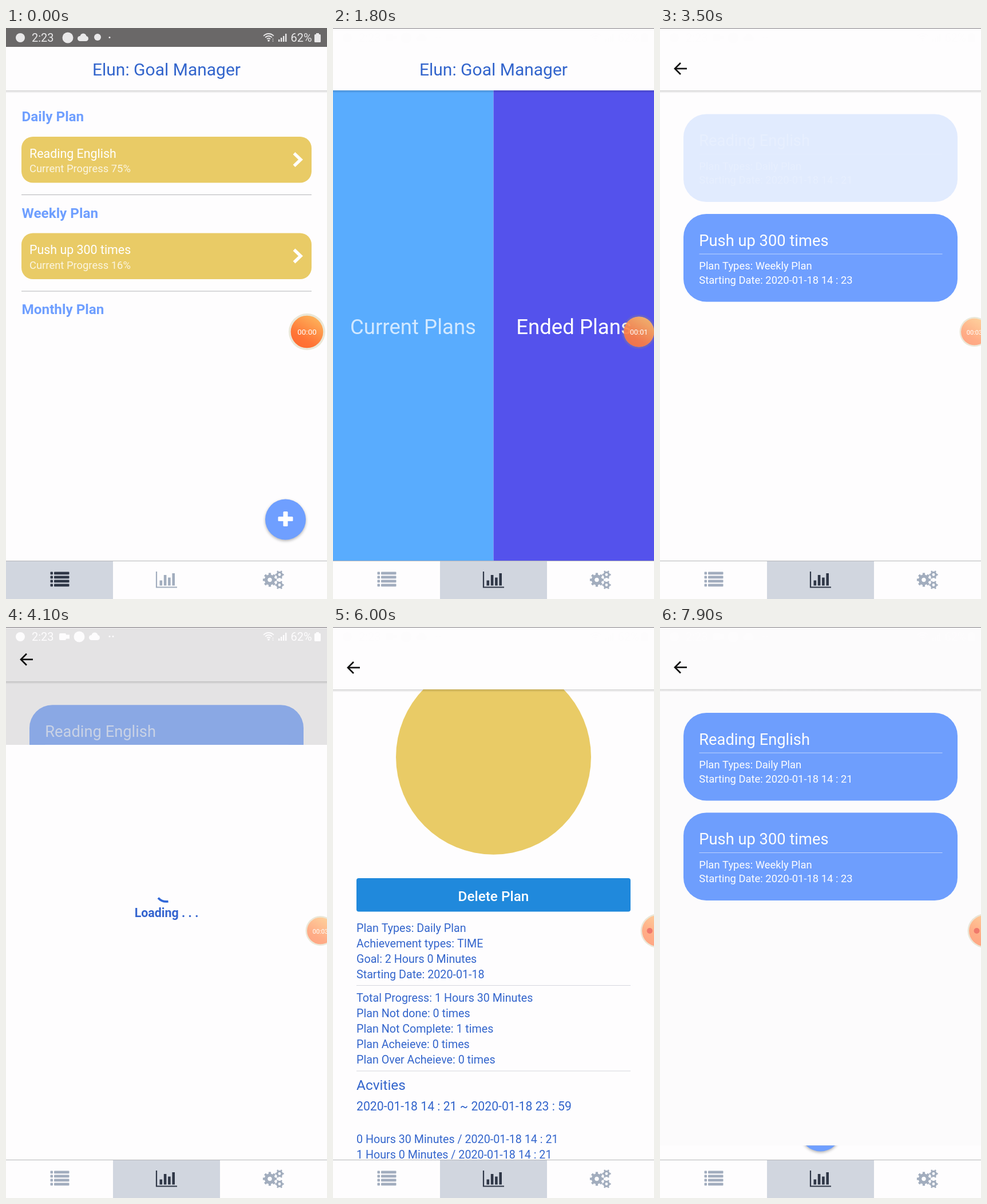
An HTML page with a canvas for the animation above (8 s loop, 561 by 998 pixels).

```html
<!DOCTYPE html>
<html lang="en">
<head>
<meta charset="utf-8">
<title>Plan manager</title>
<style>
  html, body { margin: 0; width: 100%; height: 100%; overflow: hidden; background: #fefdfe; }
  canvas { display: block; width: 100%; height: 100%; }
</style>
</head>
<body>
<canvas id="stage" width="561" height="998"></canvas>
<script>
const ctx = document.getElementById('stage').getContext('2d');
const W = 561, VIEW = 931, HEADER = 109, LOOP = 8000, STEP = 100;
const PAPER = '#fefdfe', BLUE = '#3365cc', SKY = '#6f9fff', GOLD = '#e9cb66', WHITE = '#fff';

const clamp = v => Math.max(0, Math.min(1, v));
const mix = (a, b, k) => a + (b - a) * k;
const span = (t, from, to) => clamp((t - from) / (to - from));
const easeOut = k => 1 - (1 - k) ** 3;
const easeInOut = k => k < .5 ? 2 * k * k : 1 - 2 * (1 - k) ** 2;

// cubic-bezier(.35, .45, 0, 1), solved by bisection
function revealEase(x) {
  if (x <= 0 || x >= 1) return clamp(x);
  let lo = 0, hi = 1;
  for (let i = 0; i < 24; i++) {
    const s = (lo + hi) / 2;
    if (1.05 * (1 - s) ** 2 * s + s ** 3 < x) lo = s; else hi = s;
  }
  return 1.35 * (1 - lo) ** 2 * lo + 3 * (1 - lo) * lo * lo + lo ** 3;
}
const reveal = (t, start) => revealEase((t - start) / 425);

function rect(x, y, w, h, color, radius = 0) {
  ctx.fillStyle = color;
  ctx.beginPath();
  ctx.roundRect(x, y, w, h, radius);
  ctx.fill();
}
function disc(x, y, r, color) {
  ctx.fillStyle = color;
  ctx.beginPath();
  ctx.arc(x, y, r, 0, 7);
  ctx.fill();
}
function line(points, color, width) {
  ctx.strokeStyle = color;
  ctx.lineWidth = width;
  ctx.beginPath();
  points.forEach(([x, y]) => ctx.lineTo(x, y));
  ctx.stroke();
}
function text(str, x, y, size, color, weight = 400, align = 'left') {
  ctx.font = `${weight} ${size}px Roboto, sans-serif`;
  ctx.fillStyle = color;
  ctx.textAlign = align;
  ctx.fillText(str, x, y);
}
function group(draw, alpha = 1, x = 0, y = 0) {
  ctx.save();
  ctx.globalAlpha *= alpha;
  ctx.translate(x, y);
  draw();
  ctx.restore();
}

function roundButton(x, y) {
  group(() => {
    ctx.shadowColor = 'rgba(0,0,0,.3)';
    ctx.shadowBlur = 5;
    ctx.shadowOffsetY = 2;
    disc(x, y, 35.5, SKY);
  });
  rect(x - 13, y - 5, 26, 8, WHITE, 1.5);
  rect(x - 4, y - 14, 8, 26, WHITE, 1.5);
}

function header(title) {
  const shade = ctx.createLinearGradient(0, HEADER, 0, HEADER + 5);
  shade.addColorStop(0, 'rgba(0,0,0,.16)');
  shade.addColorStop(1, 'rgba(0,0,0,0)');
  rect(0, HEADER, W, 5, shade);
  rect(0, -20, W, HEADER + 20, PAPER);
  if (title) return text(title, W / 2, 83, 30, BLUE, 400, 'center');
  line([[47, 71], [27, 71]], '#111', 2.7);
  line([[36, 61], [26, 71], [36, 81]], '#111', 2.7);
}

function planRow(heading, title, progress, y) {
  text(heading, 27.5, y + 163, 24.3, SKY, 700);
  if (!title) return;
  rect(27, y + 190, 507, 80.5, GOLD, 20);
  text(title, 41, y + 226.5, 21.4, WHITE);
  group(() => text(`Current Progress ${progress}%`, 41, y + 252, 18.4, WHITE), .8);
  line([[503.5, y + 219], [515, y + 230], [503.5, y + 241]], WHITE, 5.5);
  rect(27, y + 291, 507, 1, '#b4b4b8');
}

function homeScreen() {
  rect(0, 0, W, VIEW, PAPER);
  planRow('Daily Plan', 'Reading English', 75, 0);
  planRow('Weekly Plan', 'Push up 300 times', 16, 168.5);
  planRow('Monthly Plan', '', 0, 337);
  roundButton(488.5, 859);
  header('Elun: Goal Manager');
}

function chartScreen(t) {
  const pressed = mix(1, .2, span(t, 1750, 1900));
  const alpha = mix(pressed, 1, easeInOut(span(t, 2060, 2310)));
  rect(0, 0, W, VIEW + 20, PAPER);
  group(() => {
    rect(0, HEADER, 280.5, VIEW, '#1e90ff');
    text('Current Plans', 140, 534.5, 36.6, WHITE, 400, 'center');
  }, alpha);
  rect(280.5, HEADER, 281, VIEW, '#5452ec');
  text('Ended Plans', 421, 534.5, 36.6, WHITE, 400, 'center');
  header('Elun: Goal Manager');
}

function loadingScreen(t) {
  rect(0, 0, W, VIEW, PAPER);
  const start = (-72 + (t - 2200) * .27) * Math.PI / 180;
  ctx.strokeStyle = '#3067d8';
  ctx.lineWidth = 3.7;
  ctx.beginPath();
  ctx.arc(280.5, 452, 19.5, start, start + 1);
  ctx.stroke();
  text('Loading . . .', W / 2, 499, 21.4, '#3464cf', 700, 'center');
}

function planCard(title, type, time, y) {
  rect(41, y, 479, 153.5, SKY, 40);
  text(title, 68.3, y + 55.5, 27.3, WHITE);
  rect(68.5, y + 69.5, 425, 1, 'rgba(255,255,255,.55)');
  text(`Plan Types: ${type} Plan`, 68.3, y + 97, 18.4, WHITE);
  text(`Starting Date: 2020-01-18 ${time}`, 68.3, y + 121.5, 18.4, WHITE);
}

function listScreen(t) {
  if (t < 2400) return loadingScreen(t);
  rect(0, 0, W, VIEW + 20, PAPER);
  const alpha = t < 3500 ? 1 : mix(.2, 1, easeInOut(span(t, 3960, 4210)));
  group(() => planCard('Reading English', 'Daily', '14 : 21', 150.5), alpha);
  planCard('Push up 300 times', 'Weekly', '14 : 23', 325);
  header();
}

function detailContent() {
  const lines = (rows, y) => rows.forEach((row, i) => text(row, 41, y + 27 * i, 19.7, BLUE));
  text('Reading English', W / 2, 182.5, 30, BLUE, 400, 'center');
  disc(280.5, 388.7, 170.5, GOLD);
  rect(41, 600.5, 479, 58.5, '#2089dc', 4);
  text('Delete Plan', 280.5, 640, 24.3, WHITE, 500, 'center');
  lines(['Plan Types: Daily Plan', 'Achievement types: TIME',
    'Goal: 2 Hours 0 Minutes', 'Starting Date: 2020-01-18'], 694);
  rect(41, 787.5, 479, 1, '#d5d7de');
  lines(['Total Progress: 1 Hours 30 Minutes', 'Plan Not done: 0 times',
    'Plan Not Complete: 1 times', 'Plan Acheieve: 0 times',
    'Plan Over Acheieve: 0 times'], 816);
  rect(41, 937, 479, 1, '#d5d7de');
  text('Acvities', 41, 970, 24.4, BLUE);
  text('2020-01-18 14 : 21 ~ 2020-01-18 23 : 59', 41, 1006.5, 21.2, BLUE);
  lines(['0 Hours 30 Minutes / 2020-01-18 14 : 21',
    '1 Hours 0 Minutes / 2020-01-18 14 : 21'], 1063);
  roundButton(280.5, 1146);
}

function detailScreen(t) {
  if (t < 4500) return loadingScreen(t);
  rect(0, 0, W, VIEW, PAPER);
  const scroll = t < 5200 ? 0 : mix(161.5, 302, easeOut(span(t, 6120, 6500)));
  group(detailContent, 1, 0, -scroll);
  const port = 823, ratio = port / (t < 6200 ? 985 : 1125);
  const barAlpha = t < 6200 ? clamp((6000 - t) / 400) : clamp((6900 - t) / 300);
  group(() => rect(555.5, HEADER + scroll * ratio, 5.5, port * ratio, '#b3b2b4'), barAlpha);
  header();
}

// The upper screen is uncovered from the bottom while the lower one drifts up and dims.
function stack(lower, upper, p) {
  if (p <= 0) return lower();
  if (p >= 1) return upper();
  group(lower, 1, 0, -18.3 * p);
  rect(0, 0, W, VIEW, `rgba(0,0,0,${.1 * Math.min(1, p / .36)})`);
  group(() => {
    ctx.beginPath();
    ctx.rect(0, VIEW * (1 - p), W, VIEW);
    ctx.clip();
    ctx.translate(0, VIEW * .0409 * (1 - p));
    upper();
  });
}

function statusBar(t) {
  const shade = t < 100 ? 1 : clamp((200 - t) / 150);
  rect(0, 0, W, 1, '#807d82');
  group(() => rect(0, 0, W, 33, '#6a6868'), shade);
  const ink = shade ? '#e9e8e9' : '#fdfcfd';
  const recording = t >= 200, shift = recording ? 20 : 0;
  disc(25, 17, 8, ink);
  text('2:23', 45, 24, 20, ink);
  if (recording) {
    rect(93, 11, 12, 12, ink, 2);
    line([[104, 17], [111, 17]], ink, 7);
  }
  disc(108 + shift, 17, 9.5, ink);
  rect(125 + shift, 14, 19, 9, ink, 4.5);
  disc(135 + shift, 15, 5.5, ink);
  if (!recording) disc(160, 16, 6, ink);
  disc(181, 16.5, 1.5, ink);
  if (recording) disc(187, 16.5, 1.5, ink);
  ctx.strokeStyle = ink;
  ctx.lineWidth = 1.8;
  for (const r of [4, 8, 12]) {
    ctx.beginPath();
    ctx.arc(459, 22, r, -2.4, -.75);
    ctx.stroke();
  }
  disc(459, 22, 1.8, ink);
  text('↕', 464, 24, 10, ink);
  [4, 7, 10, 14].forEach((h, i) => rect(476 + 4 * i, 24 - h, 2.4, h, ink));
  text('62%', 497.5, 24, 20, ink);
  rect(539, 11, 11, 14, ink, 1.5);
  rect(542, 9, 5, 3, ink);
}

function gear(x, y, r, teeth, color) {
  group(() => {
    ctx.strokeStyle = color;
    ctx.lineWidth = r * .52;
    ctx.beginPath();
    ctx.arc(0, 0, r * .62, 0, 7);
    ctx.stroke();
    for (let i = 0; i < teeth; i++) {
      ctx.rotate(2 * Math.PI / teeth);
      rect(r * .7, -r * .2, r * .45, r * .4, color);
    }
  }, 1, x, y);
}

function tabBar(active) {
  const color = i => i === active ? '#2f3747' : '#a2adbe';
  rect(0, VIEW, W, 67, PAPER);
  rect(active * 187, VIEW, 187, 67, '#d1d6df');
  rect(0, VIEW, W, 1, '#b5b6b9');
  for (let i = 0; i < 4; i++) {
    rect(77.5, 950.5 + 7 * i, 4.5, 4.7, color(0), 1);
    rect(84, 950.5 + 7 * i, 26.5, 4.7, color(0), 1);
  }
  line([[263, 950], [263, 977.5], [299, 977.5]], color(1), 2.2);
  [9, 18.5, 14, 21.5].forEach((h, i) => rect(268.5 + 7.3 * i, 974.5 - h, 4.6, h, color(1)));
  gear(461, 964.5, 10.5, 8, color(2));
  gear(478, 955.5, 6.6, 6, color(2));
  gear(478, 973.5, 6.6, 6, color(2));
}

function recorder(t) {
  const dock = easeOut(span(t, 1700, 2400)), tuck = span(t, 5600, 6000);
  const x = mix(mix(526, 549.5, dock), 567, tuck);
  const r = mix(mix(28.3, 23.5, dock), 27, tuck), y = 531;
  const seconds = [1400, 2300, 3200, 4300, 5200].filter(s => t >= s).length;
  const fill = ctx.createLinearGradient(x + r * .6, y - r, x - r * .6, y + r);
  fill.addColorStop(0, '#fdb65d');
  fill.addColorStop(.7, '#ff7536');
  fill.addColorStop(1, '#ff6a30');
  group(() => {
    disc(x, y, r + mix(3.7, 2.5, dock), 'rgba(165,150,80,.22)');
    if (dock > 0) group(() => disc(x, y, r, WHITE), dock);
    group(() => disc(x, y, r, fill), mix(1, .6, dock));
    group(() => text(`00:0${seconds}`, x, y + 4.5, mix(13.5, 11, dock), WHITE, 400, 'center'), 1 - tuck);
    group(() => disc(553.5, y, 5, '#f0796b'), tuck);
  });
}

function render(t) {
  rect(0, 0, W, 998, PAPER);
  group(() => {
    ctx.beginPath();
    ctx.rect(0, 0, W, VIEW);
    ctx.clip();
    if (t < 800) homeScreen();
    else if (t < 3500) stack(() => chartScreen(t), () => listScreen(t), reveal(t, 2065));
    else stack(() => listScreen(t), () => detailScreen(t), reveal(t, 3965) - reveal(t, 7614));
  });
  statusBar(t);
  tabBar(t < 800 ? 0 : 1);
  recorder(t);
}

const begin = performance.now();
function tick() {
  const t = (performance.now() - begin) % LOOP;
  render(Math.floor(t / STEP) * STEP);
  requestAnimationFrame(tick);
}
tick();
</script>
</body>
</html>
```
